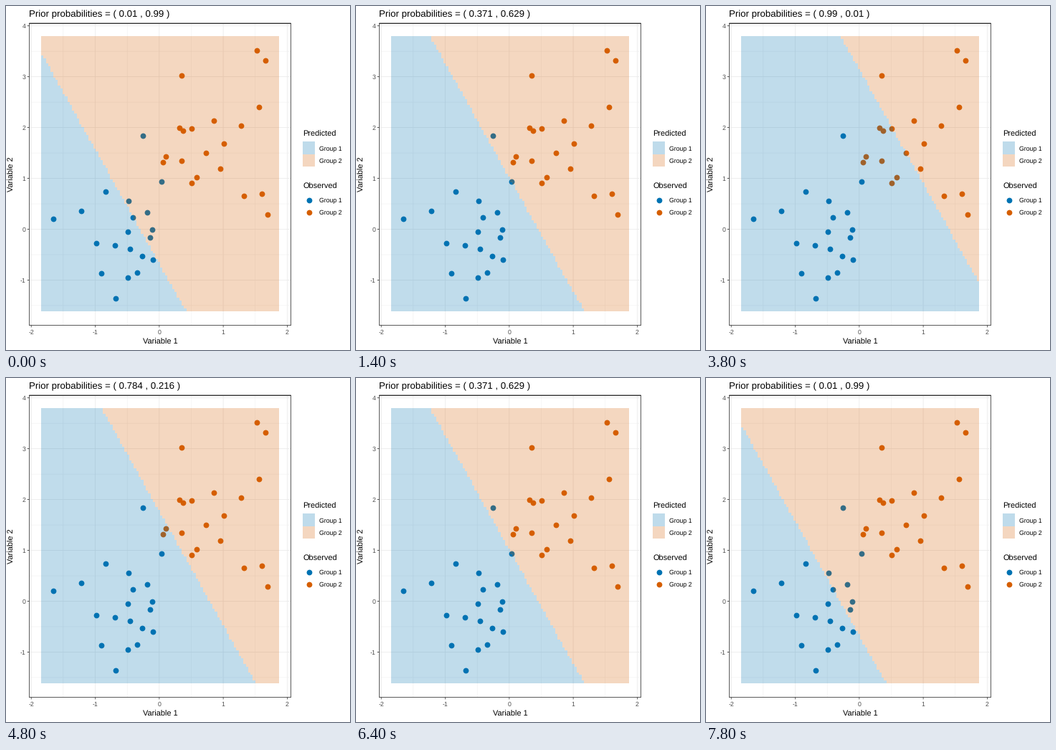
Write a matplotlib script that moves like this. It is 480 by 480 pixels and loops after 8000 ms.

```python
import numpy as np
import matplotlib.pyplot as plt
from matplotlib.animation import FuncAnimation
from matplotlib.colors import to_rgb

SIZE, DPI = 480, 100
STEPS = 20
PT = 72 / DPI  # points per pixel
BLUE, ORANGE = "#0072B2", "#D55E00"
X0, X1, Y0, Y1 = 32.4, 397.6, 24.2, 445.6  # panel edges, pixels
CELLS = 100

plt.rcParams["font.family"] = "Liberation Sans"
plt.rcParams["text.hinting"] = "none"

group1 = np.array([
    (65.3, 296.7), (104.3, 285.4), (138.7, 258.3), (170.7, 271.3),
    (176.8, 295.0), (196.7, 287.5), (203.5, 311.7), (200.4, 323.0),
    (169.7, 314.3), (126.2, 330.3), (151.8, 334.2), (173.0, 339.2),
    (190.2, 348.8), (204.5, 353.8), (132.3, 372.3), (183.2, 372.0),
    (169.7, 378.5), (153.2, 407.5), (191.0, 181.2), (216.8, 244.5)]) + 0.2
group2 = np.array([
    (350.2, 62.2), (361.5, 76.0), (244.5, 97.0), (352.5, 140.4),
    (328.2, 166.3), (289.7, 159.4), (241.5, 169.5), (246.3, 173.8),
    (259.0, 170.4), (303.4, 191.4), (278.6, 205.0), (223.2, 209.7),
    (218.6, 217.4), (244.3, 215.5), (299.0, 226.6), (265.4, 239.1),
    (258.7, 247.2), (331.3, 264.4), (357.0, 262.0), (364.7, 290.8)]) + 0.2

# Linear discriminant with pooled covariance
mean1, mean2 = group1.mean(0), group2.mean(0)
pooled = (np.cov(group1.T) + np.cov(group2.T)) / 2
weight = np.linalg.solve(pooled, mean2 - mean1)
middle = (mean1 + mean2) / 2 + (0.8, 0)

# The prediction raster fills the panel less a 5 % expansion
pad_x, pad_y = (X1 - X0) / 22, (Y1 - Y0) / 22
left, right, top, bottom = X0 + pad_x, X1 - pad_x, Y0 + pad_y, Y1 - pad_y
mid_cells = (np.arange(CELLS) + 0.5) / CELLS
gx, gy = np.meshgrid(left + (right - left) * mid_cells,
                     top + (bottom - top) * mid_cells)
score = (gx - middle[0]) * weight[0] + (gy - middle[1]) * weight[1]

fig = plt.figure(figsize=(SIZE / DPI, SIZE / DPI), dpi=DPI, facecolor="white")
ax = fig.add_axes([0, 0, 1, 1])
ax.axis("off")


def sx(v):
    return 213.8 + 89.3 * v


def sy(v):
    return 311.5 - 70.95 * v


def line(xs, ys, color, width, z):
    ax.plot(xs, ys, color=color, lw=width * PT, zorder=z, snap=False,
            solid_capstyle="butt", solid_joinstyle="miter")


def text(x, y, s, size, color="black", **kw):
    kw.setdefault("va", "baseline")
    return ax.text(x, y, s, fontsize=size * PT, color=color, **kw)


def dots(xy, color):
    ax.scatter(*np.transpose(xy), s=(7.8 * PT) ** 2, color=color,
               linewidths=0, zorder=3)


def shade(p):
    blue = score < np.log(p / (1 - p))
    rgba = np.full((CELLS, CELLS, 4), 0.25)
    rgba[..., :3] = np.where(blue[..., None], to_rgb(BLUE), to_rgb(ORANGE))
    return rgba


# Grid, ticks and tick labels
for v in np.arange(-1.5, 2, 1):
    line([sx(v)] * 2, [Y0, Y1], "#EBEBEB", 0.4, 1)
for v in np.arange(-1.5, 4, 1):
    line([X0, X1], [sy(v)] * 2, "#EBEBEB", 0.4, 1)
for v in range(-2, 3):
    line([sx(v)] * 2, [Y0, Y1], "#EBEBEB", 0.8, 1)
    line([sx(v)] * 2, [Y1, Y1 + 2.75], "#333333", 0.8, 5)
    text(sx(v), 457.7, str(v), 8.8, "#4D4D4D", ha="center")
for v in range(-1, 5):
    line([X0, X1], [sy(v)] * 2, "#EBEBEB", 0.8, 1)
    line([X0 - 2.75, X0], [sy(v)] * 2, "#333333", 0.8, 5)
    text(X0 - 4.95, sy(v) + 3.15, str(v), 8.8, "#4D4D4D", ha="right")
line([X0, X1, X1, X0, X0, X1], [Y0, Y0, Y1, Y1, Y0, Y0], "#333333", 0.8, 5)

dots(group1, BLUE)
dots(group2, ORANGE)

title = text(X0, 15, "", 13.2)
text((X0 + X1) / 2, 472, "Variable 1", 11, ha="center")
text(13, (Y0 + Y1) / 2, "Variable 2", 11, rotation=90, ha="right",
     va="center", rotation_mode="default")

# Legends
text(414.2, 182, "Predicted", 11)
text(414.2, 255, "Observed", 11)
for i, color in enumerate((BLUE, ORANGE)):
    dy = 17.28 * i
    ax.add_patch(plt.Rectangle((414.2, 189.3 + dy), 17.28, 17.28, fc=color,
                               alpha=0.25, lw=0))
    dots([(422.9, 271 + dy)], color)
    for base in (202, 274.2):
        text(437, base + dy, f"Group {i + 1}", 8.8)

raster = ax.imshow(shade(0.5), extent=(left, right, bottom, top),
                   interpolation="nearest", aspect="auto", zorder=4)
ax.set_xlim(0, SIZE)
ax.set_ylim(SIZE, 0)


def update(i):
    k = min(i, 2 * STEPS - 1 - i)
    p = 0.01 + 0.98 * k / (STEPS - 1)
    raster.set_data(shade(p))
    title.set_text(f"Prior probabilities = ( {round(p, 3):g} , "
                   f"{round(1 - p, 3):g} )")
    return raster, title


anim = FuncAnimation(fig, update, frames=2 * STEPS, interval=200, repeat=True,
                     repeat_delay=0, init_func=lambda: update(0))
plt.show()
```
